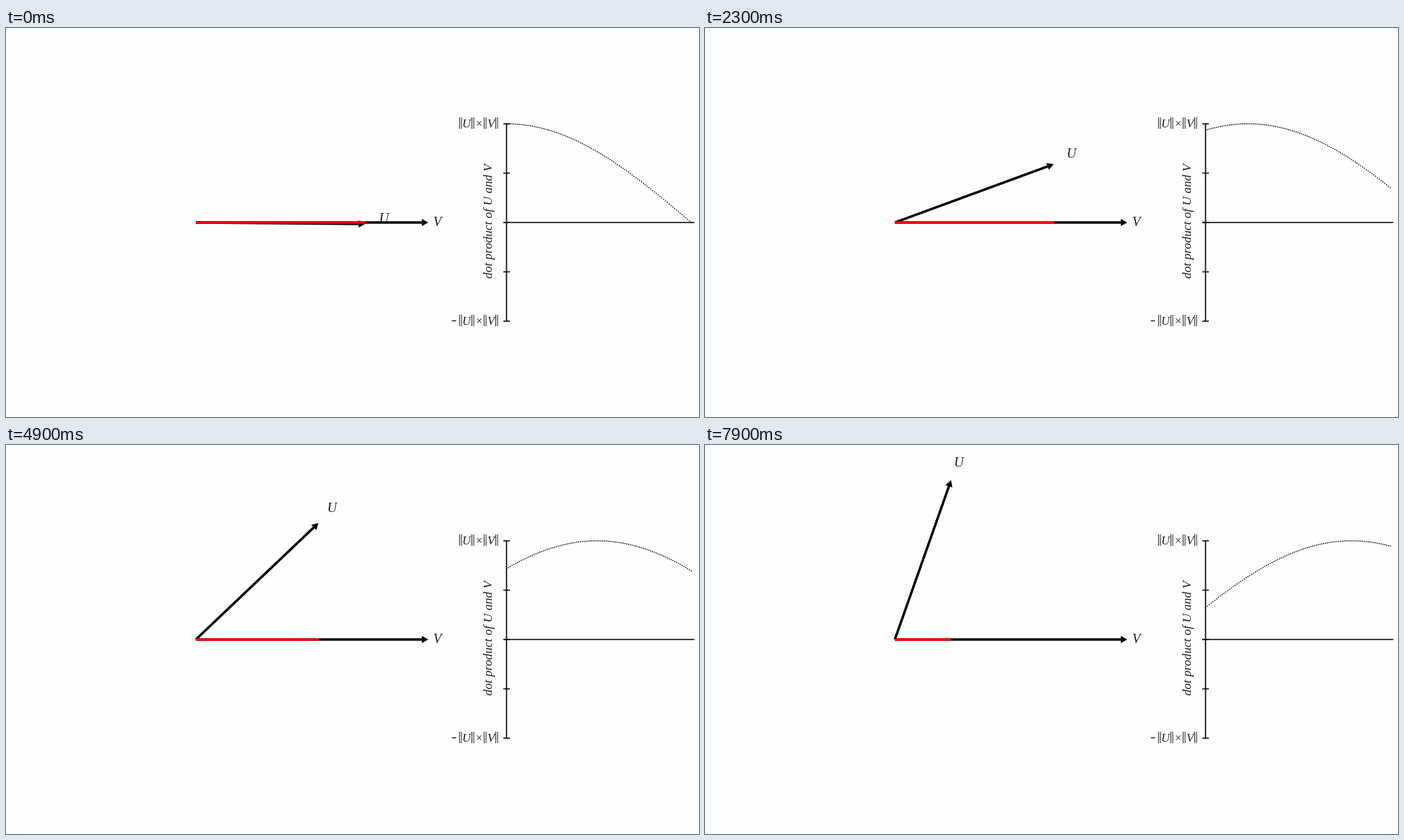
A matplotlib script that plays this animation: 960 by 540 pixels, repeating every 8 s.

```python
import numpy as np
import matplotlib.pyplot as plt
from matplotlib.animation import FuncAnimation
from matplotlib.collections import LineCollection
from matplotlib.patches import Polygon

W, H, DPI = 960, 540, 100
PX = 72 / DPI                      # points per pixel
FRAMES, INTERVAL = 80, 100
STEP = np.radians(0.9)             # rotation per frame
LAG = np.radians(0.5)              # the drawn arrow trails the label
ORIGIN = np.array([263.0, 270.0])
U_LEN, V_LEN = 234.5, 322
AXIS_X, AXIS_Y, AMP = 693.4, 270, 137
DOTS = np.arange(101)
DOT = 1.4
INK = "#1c1c1c"

plt.rcParams["font.family"] = "Liberation Serif"
fig = plt.figure(figsize=(W / DPI, H / DPI), dpi=DPI, facecolor="#fdfffd")
ax = fig.add_axes([0, 0, 1, 1])
ax.set_xlim(0, W)
ax.set_ylim(H, 0)
ax.axis("off")


def line(x0, y0, x1, y1, width, color="black", z=2):
    return ax.plot([x0, x1], [y0, y1], color=color, lw=width * PX,
                   solid_capstyle="butt", snap=False, zorder=z)[0]


def label(x, y, text, size, style="italic", **kw):
    kw = {"ha": "center", "va": "baseline", **kw}
    return ax.text(x, y, text, fontsize=size * PX, style=style,
                   color=INK, zorder=5, **kw)


def polar(radius, angle):
    return radius * np.array([np.cos(angle), -np.sin(angle)])


class Arrow:
    HEAD, HALF = 9, 5

    def __init__(self, length, z):
        self.length = length
        self.shaft = line(0, 0, 0, 0, 3.4, z=z)
        self.head = ax.add_patch(Polygon(np.zeros((3, 2)), fc="black", lw=0, zorder=z))
        self.turn(0)

    def turn(self, angle):
        tip = ORIGIN + polar(self.length, angle)
        neck = ORIGIN + polar(self.length - self.HEAD, angle)
        side = polar(self.HALF, angle + np.pi / 2)
        self.shaft.set_data(*np.transpose([ORIGIN, neck]))
        self.head.set_xy([tip, neck + side, neck - side])


def norm_product(y):
    for x in (628.3, 645.3, 662.3, 678.3):
        for dx in (0, 2.7):
            line(x + dx, y - 8, x + dx, y + 8, 1, INK)
    label(637.8, y + 5.5, "U", 16.5)
    label(655, y + 5, "×", 16, style="normal")
    label(671.3, y + 5.5, "V", 16.5)


# Graph axes and labels
line(AXIS_X, AXIS_Y - AMP, AXIS_X, AXIS_Y + AMP, 1.6)
for y in AXIS_Y + AMP * np.linspace(-1, 1, 5):
    line(689, y, 698, y, 1.5)
line(689, AXIS_Y, 953.5, AXIS_Y, 1.5)
norm_product(132)
norm_product(406)
line(617.5, 406.5, 623.5, 406.5, 1.2)
label(678, 267.5, "dot product of U and V", 17.2,
      rotation=90, ha="right", va="center")

# Vectors
u_arrow = Arrow(U_LEN, 2)
v_arrow = Arrow(V_LEN, 3)
label(596.5, 275, "V", 18.5)
u_label = label(0, 0, "U", 18.5)
projection = line(*ORIGIN, *ORIGIN, 3.4, "red", 4)

curve = ax.add_collection(LineCollection(
    [], colors="black", linewidths=DOT * PX, capstyle="butt", zorder=3))
curve.set_snap(False)


def update(k):
    angle = k * STEP
    u_arrow.turn(angle - LAG)
    end = ORIGIN[0] + (U_LEN + 0.5) * np.cos(angle - LAG)
    projection.set_data([ORIGIN[0], end], [ORIGIN[1]] * 2)
    u_label.set_position(ORIGIN + polar(254, angle) + (6, 0))

    x = AXIS_X + 2.56 * DOTS
    y = AXIS_Y - AMP * np.cos(angle - DOTS * STEP)
    curve.set_segments([[(a - DOT / 2, b), (a + DOT / 2, b)] for a, b in zip(x, y)])
    return u_arrow.shaft, u_arrow.head, projection, u_label, curve


anim = FuncAnimation(fig, update, frames=FRAMES, interval=INTERVAL,
                     repeat=True, repeat_delay=0, blit=False)
plt.show()
```
